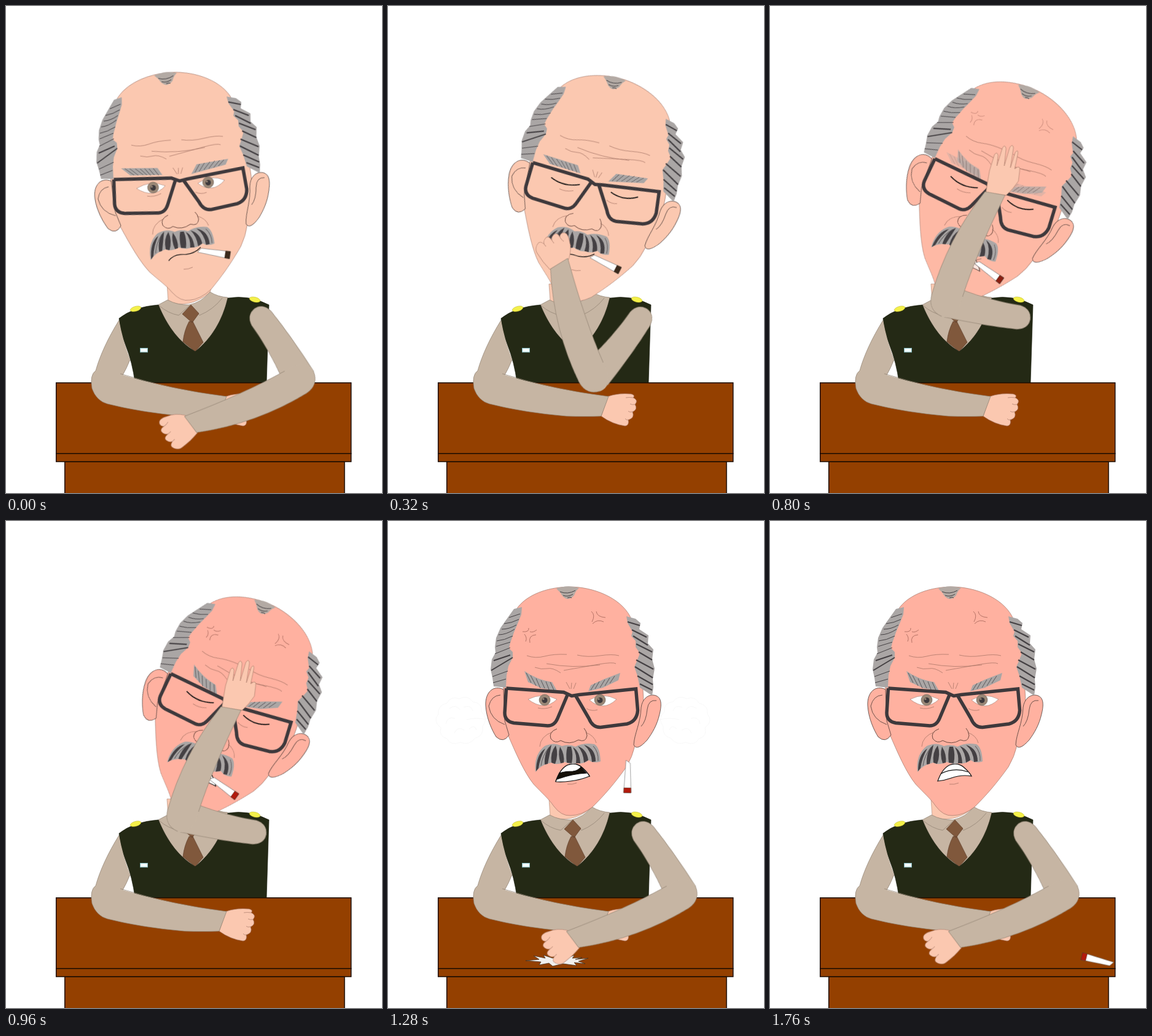
Recreate the animation shown at these times as an HTML page. Size 612 by 792 pixels, loop 2000 ms.

```html
<!DOCTYPE html>
<html lang="en">
<head>
<meta charset="utf-8">
<title>Angry man at a desk</title>
<style>
html, body { margin: 0; width: 100%; height: 100%; overflow: hidden; background: #fff; }
svg { display: block; width: 612px; height: 792px; }

/* One loop is 50 steps of 40 ms, so 2% is one step. */
.head, .upper, .fore, .skin, .calm, .angry, .open, .shut, .fist, .palm,
.shout, .held, .shift, .ember, .fly, .splat, .puff { animation: 2s linear infinite; }

.head { transform-origin: 292px 458px; animation-name: head; }
.upper { animation-name: upper; }
.fore { animation-name: fore; }
.skin { animation-name: flush; }
.calm { animation-name: calm; }
.angry { animation-name: angry; }
.open { animation-name: open; }
.shut { animation-name: shut; }
.fist { animation-name: fist; }
.palm { animation-name: palm; }
.shout { animation-name: shout; }
.held { animation-name: held; }
.shift { animation-name: shift; }
.ember { animation-name: ember; }
.fly { animation-name: fly; }
.splat { animation-name: splat; }
.puff { transform-origin: 120px 325px; animation-name: puff; }
.open, .shut, .fist, .palm, .shout, .held, .splat { animation-timing-function: step-end; }

@keyframes head {
  0% { transform: rotate(-5.4deg); animation-timing-function: steps(12); }
  24% { transform: rotate(21.7deg); }
  50% { transform: rotate(21.7deg); animation-timing-function: steps(6); }
  62%, 100% { transform: rotate(0deg); }
}
@keyframes upper {
  0% { transform: translate(414.5px, 507px) rotate(56.6deg); animation-timing-function: steps(6); }
  12% { transform: translate(412px, 507px) rotate(99.6deg); animation-timing-function: steps(2); }
  16% { transform: translate(411px, 507px) rotate(127.4deg); animation-timing-function: steps(4); }
  24% { transform: translate(406px, 506px) rotate(191.4deg); }
  50% { transform: translate(406px, 506px) rotate(191.4deg); animation-timing-function: steps(3); }
  56% { transform: translate(412px, 507px) rotate(99.6deg); animation-timing-function: steps(3); }
  62%, 100% { transform: translate(414.5px, 507px) rotate(56.6deg); }
}
@keyframes fore {
  0% { transform: translate(117px, 0px) rotate(100.4deg); animation-timing-function: steps(6); }
  12% { transform: translate(114.6px, 0px) rotate(123.4deg); animation-timing-function: steps(2); }
  16% { transform: translate(122px, 0px) rotate(125.1deg); animation-timing-function: steps(4); }
  24% { transform: translate(121px, 0px) rotate(102.6deg); }
  50% { transform: translate(121px, 0px) rotate(102.6deg); animation-timing-function: steps(3); }
  56% { transform: translate(114.6px, 0px) rotate(123.4deg); animation-timing-function: steps(3); }
  62%, 100% { transform: translate(117px, 0px) rotate(100.4deg); }
}
@keyframes flush {
  0% { fill: #fbc8b0; }
  24% { fill: #fbc8b0; animation-timing-function: steps(12); }
  48%, 100% { fill: #ffb1a0; }
}
@keyframes calm {
  0% { opacity: 1; }
  24% { opacity: 1; animation-timing-function: steps(12); }
  48%, 100% { opacity: 0; }
}
@keyframes angry {
  0% { opacity: 0; }
  24% { opacity: 0; animation-timing-function: steps(12); }
  48%, 100% { opacity: 1; }
}
@keyframes shift {
  0% { transform: translate(0px, 0px); }
  24% { transform: translate(0px, 0px); animation-timing-function: steps(12); }
  48%, 100% { transform: translate(-3px, 6px); }
}
@keyframes ember {
  0% { fill: #3b2a1c; }
  24% { fill: #3b2a1c; animation-timing-function: steps(12); }
  48%, 100% { fill: #b31a0c; }
}
@keyframes open { 0% { opacity: 1; } 8% { opacity: 0; } 52%, 100% { opacity: 1; } }
@keyframes shut { 0% { opacity: 0; } 8% { opacity: 1; } 52%, 100% { opacity: 0; } }
@keyframes fist { 0% { opacity: 1; } 20% { opacity: 0; } 52%, 100% { opacity: 1; } }
@keyframes palm { 0% { opacity: 0; } 20% { opacity: 1; } 52%, 100% { opacity: 0; } }
@keyframes shout { 0% { opacity: 0; } 60% { opacity: 1; } 78%, 100% { opacity: 0; } }
@keyframes splat { 0% { opacity: 0; } 62% { opacity: 1; } 70%, 100% { opacity: 0; } }
@keyframes held { 0% { opacity: 1; } 60%, 100% { opacity: 0; } }
@keyframes fly {
  0% { opacity: 0; transform: translate(344px, 416px) rotate(18deg); animation-timing-function: step-end; }
  60% { opacity: 1; transform: translate(344px, 416px) rotate(18deg); animation-timing-function: steps(2); }
  64% { opacity: 1; transform: translate(390px, 416px) rotate(91deg); animation-timing-function: steps(3); }
  70% { opacity: 1; transform: translate(429px, 440px) rotate(120deg); animation-timing-function: steps(3); }
  76% { opacity: 1; transform: translate(468px, 515px) rotate(148deg); animation-timing-function: steps(3); }
  82% { opacity: 1; transform: translate(507px, 634px) rotate(176deg); animation-timing-function: steps(2); }
  86%, 100% { opacity: 1; transform: translate(532.5px, 714px) rotate(194deg); }
}
@keyframes puff {
  0% { opacity: 0; transform: translate(0px, 0px) scale(.9); }
  60% { opacity: 0; transform: translate(8px, 0px) scale(.9); animation-timing-function: steps(2); }
  64% { opacity: .3; transform: translate(0px, 0px) scale(1); animation-timing-function: steps(5); }
  74% { opacity: .8; transform: translate(-24px, 0px) scale(1.12); animation-timing-function: steps(7); }
  88%, 100% { opacity: 0; transform: translate(-52px, 0px) scale(1.25); }
}
</style>
</head>
<body>
<svg viewBox="0 0 612 792" fill="none">
  <defs>
    <g id="cig">
      <path d="M-22-4L26-6V6L-27 3Z" fill="#fff" stroke="#666" stroke-width=".6"/>
      <path d="M18-5.8L26-6V6L18 5.800Z" stroke="#3b2a1c" stroke-width=".5"/>
    </g>
    <g id="cloud" fill="#fff" stroke="#e8e8e8">
      <path d="M96 296Q102 284 116 289Q130 282 138 294Q154 296 152 310Q164 322 154 334Q156 350 142 353Q132 366 118 360Q102 366 96 354Q82 350 86 336Q72 326 82 314Q80 300 96 296Z"/>
      <path d="M100 305q10-8 17 2M123 303q12-5 15 6M94 330q3-13 15-9M108 345q5-12 16-5M132 338q9-8 12 2M128 323q16-4 32 0"/>
    </g>
  </defs>

  <!-- neck and shirt -->
  <path d="M262 452L264 480Q297 494 332 466L336 452Z" fill="#fbc8b0" stroke="#a98575" stroke-width=".6"/>
  <g stroke="#8f8070" stroke-width=".7">
    <path d="M248 486L263 478Q280 487 298 486Q318 482 332 465Q345 473 361 474L354 525L308 566L258 530Z" fill="#c6b5a3"/>
    <path d="M249 487Q264 500 281 503L299 487L315 503Q337 494 352 475"/>
    <path d="M298 513H304L321 547L308 562L288 546Q290 528 298 513ZM301 486L314 500L303 515L287 501Z" fill="#80583c" stroke="#5f402b"/>
  </g>

  <!-- vest -->
  <path d="M184 508Q208 489 248 486Q270 540 308 562Q348 530 361 475Q395 469 428 486L424 613H210Q206 580 194 550Q185 528 184 508Z" fill="#242915" stroke="#15180b" stroke-width=".6"/>
  <g fill="#f4f04a" stroke="#b9b52c" stroke-width=".5">
    <ellipse cx="211" cy="492.500" rx="9" ry="4" transform="rotate(-16 211 492.500)"/>
    <ellipse cx="405" cy="477.500" rx="9" ry="4" transform="rotate(14 405 477.500)"/>
  </g>
  <rect x="218.500" y="556.500" width="12" height="6.500" fill="#f4ffff" stroke="#7fb3b8"/>

  <!-- desk -->
  <g fill="#944000" stroke="#1c0d02" stroke-width="1.500">
    <rect x="95.700" y="741" width="455.300" height="60"/>
    <rect x="81.700" y="612.800" width="480" height="115"/>
    <rect x="81.700" y="727.800" width="480" height="13.200"/>
  </g>

  <!-- resting arm -->
  <path d="M358 635Q375 629 396 631Q403 633 399 637Q408 641 402 648Q407 656 398 660Q402 670 391 673Q393 682 386 683Q365 680 347 667Z" fill="#fbc8b0" stroke="#a97c6a" stroke-width=".7"/>
  <path d="M399 637Q392 636 387 637M402 648Q397 649 394 647M398 660Q393 661 391 659M391 673Q388 674 386 671" stroke="#a97c6a" stroke-width=".7"/>
  <path d="M184 511C166 540 153 568 146 593Q136 600 140 622Q147 642 165 647Q220 661 290 667Q322 668 347 667L359 635Q270 624 190 600Q196 590 202 575Q190 544 184 511Z" fill="#c6b5a3"/>
  <path d="M184 511C166 540 153 568 146 593Q136 600 140 622Q147 642 165 647Q220 661 290 667Q322 668 347 667L359 635Q270 624 186 598M190 600Q196 590 202 575" stroke="#8f8070" stroke-width=".7"/>

  <g><use href="#cloud" class="puff"/></g>
  <g transform="matrix(-1 0 0 1 602 0)"><use href="#cloud" class="puff"/></g>

  <g class="head">
    <g class="skin" stroke="#4a3a36" stroke-width=".8">
      <path d="M295 107C250 108 222 125 210 142C194 170 188 230 187 300Q189 330 194 345C207 375 221 408 237 428C250 442 262 452 270 464Q282 480 297 479Q315 479 333 465C352 446 368 428 388 400Q398 383 402 365C412 335 418 310 415 275C412 210 402 175 394 155C378 125 335 107 295 107Z" stroke="#a1776a" stroke-width=".7"/>
      <path d="M188 274C172 266 158 278 159 300C160 320 169 340 176 351Q188 362 197 348L190 325Z"/>
      <path d="M412 303C414 290 422 283 431 283C446 284 446 298 442 314C438 332 430 345 422 356Q405 375 400 364C401 345 411 330 412 303Z"/>
      <path d="M183 283Q168 284 164 301Q167 323 190 331M437 292Q424 290 422 306Q420 326 412 334" fill="none"/>
    </g>

    <!-- hair -->
    <g fill="#aaa6a5">
      <path d="M205 143L218 140L217 152L211 167L205 181L203 187L199 198L197 207L203 213V222L196 236L193 251L192 271L172 269L170 255L167 241L169 225L175 214L174 205L176 190L183 174L190 164Z"/>
      <path d="M388 155L403 159L411 166L409 176L424 186L423 199L432 209L430 225L434 240L431 257L432 270L430 284L410 271L406 252L401 237L405 228L410 215L403 205V195L396 187L398 180L390 166Z"/>
      <path d="M274 110Q292 103 311 109Q305 114 303 121Q293 132 284 122Q280 115 274 110Z" fill="#b3aaa4"/>
    </g>
    <g stroke="#444043">
      <path d="M197 157l18-6M189 167q12-1 24-7M185 176q12 0 24-7M180 185q12 0 26-9M177 195q12-1 26-8M176 204l23-7M174 216l25-10M170 253l25-9M171 263l21-6"/>
      <path d="M280 115q12 5 25-2M285 121q8 3 16-2M292 125q5-2 7 0"/>
      <path d="M168 243l35-21M172 227l27-9" stroke-width="2"/>
      <path d="M390 164l20 6M397 177l24 12M399 187l24 15M404 200l26 13M408 213l22 13M404 226l28 15M402 237l29 18M406 252l25 14M410 265l20 10" stroke-width="2.200"/>
    </g>

    <!-- wrinkles -->
    <path d="M226 219Q240 224 255 220T291 217M308 218Q325 222 345 219T376 219M258 232Q300 240 345 234M239 238Q250 242 259 240T281 247M286 243Q320 237 343 233T371 232M290 262l6 11M298 273l1-10M302 273l4-10M268 343Q248 350 247 367M322 344Q336 349 339 361M244 304Q255 307 267 302M323 305Q332 310 341 307M292 428Q300 429 307 426" stroke="#a06f61" stroke-width=".7"/>
    <path d="M275 338Q261 343 265 354Q272 363 281 357Q295 365 310 356Q322 361 324 349Q323 341 319 337" stroke="#6d4a40"/>
    <path class="angry" d="M219 180Q230 181 229 174M231 180Q236 182 242 177M222 184Q227 190 224 196M231 198Q228 186 241 185M331 147Q338 153 332 164M333 167Q341 159 351 164M339 147Q340 156 354 157" stroke="#96594e" stroke-width=".7"/>

    <!-- brows -->
    <g class="calm">
      <path d="M206 255L265 260L272 272L220 268ZM329 260L381 256L376 265L319 275Z" fill="#aaa6a5"/>
      <path d="M212 256l14 12M220 257l13 12M229 258l12 11M237 259l10 11M244 259l9 12M251 260l8 11M258 260l8 12M325 273l9-13M332 272l10-13M340 270l11-12M348 269l11-12M356 268l11-11M364 266l10-9" stroke="#5b575a"/>
    </g>
    <g class="angry">
      <path d="M222 244Q242 258 267 262L275 276L250 272L228 262ZM378 247L375 259L350 271L326 277L330 267L352 257Z" fill="#aaa6a5"/>
      <path d="M225 247l8 16M232 251l9 17M241 256l7 16M249 259l6 13M257 261l5 13M264 262l6 13M330 275l7-11M337 273l7-12M345 271l8-13M353 268l8-13M361 264l8-12" stroke="#5b575a"/>
    </g>

    <!-- eyes -->
    <g class="open">
      <path d="M228 290Q252 278 275 290Q254 310 228 290ZM328 291Q350 278 372 290Q350 311 328 291Z" fill="#fff" stroke="#a1776a" stroke-width=".6"/>
      <g fill="#998776" stroke="#6e6054" stroke-width=".6"><circle cx="255" cy="291" r="9"/><circle cx="345" cy="291" r="9"/></g>
      <g fill="#3d393c"><circle cx="255" cy="291.500" r="4.500"/><circle cx="345" cy="291.500" r="4.500"/></g>
      <g fill="#998776"><circle cx="253" cy="289.500" r="1.500"/><circle cx="343" cy="289.500" r="1.500"/></g>
    </g>
    <path class="shut" d="M227 289Q250 300 275 290M327 291Q350 301 372 289" stroke="#111" stroke-width="1.800"/>

    <path d="M192.500 272L286 278.500L299 284.500L311 282.500L403.500 273L406.500 308Q405 326 389 330L346 335.500Q333 336 327 321L306 285M192.500 272L190 312Q190 326 205 328.500L260 333Q271 333 276 321L292 283" stroke="#3e393c" stroke-width="5.500"/>

    <!-- mouth -->
    <path class="calm" d="M269 412Q278 402 294 404T323 395" stroke="#111" stroke-width="1.200"/>
    <g class="angry" stroke="#111" stroke-width="1.200">
      <path d="M273 423Q280 403 292 397Q306 392 316 401Q325 409 328 415Q312 412 295 418Q284 422 273 423Z" fill="#fff"/>
      <path d="M278 411Q300 400 322 408"/>
    </g>
    <g class="shout" stroke="#111" stroke-width="1.200">
      <path d="M273 424Q280 403 292 397Q306 392 316 401Q325 409 328 415Q314 421 297 423Q284 425 273 424Z" fill="#fff"/>
      <path d="M279 410Q288 407 301 407Q310 406 314 400L323 410Q300 411 275 420Z" fill="#151008"/>
    </g>
    <g class="held"><g class="shift"><g class="ember"><use href="#cig" transform="translate(344 406) rotate(14)"/></g></g></g>

    <!-- moustache -->
    <path d="M240 408Q237 380 255 366Q270 359 283 366Q295 362 305 367Q318 360 336 363Q345 368 346 391Q334 395 327 389Q317 396 308 394Q297 397 288 392Q273 398 266 393Q253 396 246 402Z" fill="#aaa6a5"/>
    <path d="M241 407Q241 380 256 370Q247 386 245 402ZM255 396Q254 374 266 364Q263 380 260 395ZM266 393Q264 376 273 365Q278 380 272 395ZM281 394Q276 380 280 367Q288 380 286 393ZM291 393Q289 378 292 367H298Q302 380 299 394ZM306 394Q308 380 301 368Q312 374 313 394ZM319 393Q318 376 309 366Q324 372 326 389ZM332 392Q331 374 319 364Q338 370 338 391Z" fill="#444043"/>
    <path d="M342 390Q343 376 334 366M249 398Q251 382 262 368" stroke="#5b575a"/>
  </g>

  <path class="splat" d="M224 715L246 713L237 707L256 711L253 706L268 711L280 706L290 711L304 706L300 711L316 710L305 713L326 711L310 716L321 720L303 718L307 723L285 720L268 724L262 719L246 722L249 717Z" fill="#f1f0ee" stroke="#3a2a1c" stroke-width=".7"/>

  <!-- moving arm -->
  <g class="upper">
    <path d="M120-24Q55-25 0-20Q-18-16-18 0Q-16 17 2 19Q50 17 100 25" fill="#c6b5a3" stroke="#8f8070" stroke-width=".7"/>
    <g class="fore">
      <g fill="#fbc8b0" stroke="#a97c6a" stroke-width=".7">
        <g class="fist" transform="translate(194 0)">
          <path d="M2 17Q16 27 30 27Q45 29 46 21Q46 16 41 14Q51 12 47 5Q45 1 40 0Q50-3 46-9Q43-14 38-14Q46-19 40-25Q34-31 27-29Q10-25-5-17Z"/>
          <path d="M41 14Q36 15 32 18M40 0Q36 1 34 2M38-14Q35-13 33-12" fill="none"/>
        </g>
        <g class="palm">
          <path transform="translate(194 0) rotate(66)" d="M-15-1Q-12-20-9-37L-1-63Q3-69 5-62L3-45L12-74Q16-81 18-73L15-45L24-75Q29-82 30-74L25-42L33-67Q38-73 37-64L32-40Q42-48 40-36L38-20Q30-8 18 3Z"/>
        </g>
      </g>
      <path d="M19 20Q92 12 198 16L190-16Q95-41 0-27Q-24-22-24 2Q-22 26 19 20Z" fill="#c6b5a3"/>
      <path d="M19 20Q92 12 198 16L190-16Q95-41 0-27Q-24-22-24 2" stroke="#8f8070" stroke-width=".7"/>
    </g>
  </g>

  <g class="fly"><use href="#cig" fill="#b31a0c"/></g>
</svg>
</body>
</html>
```
